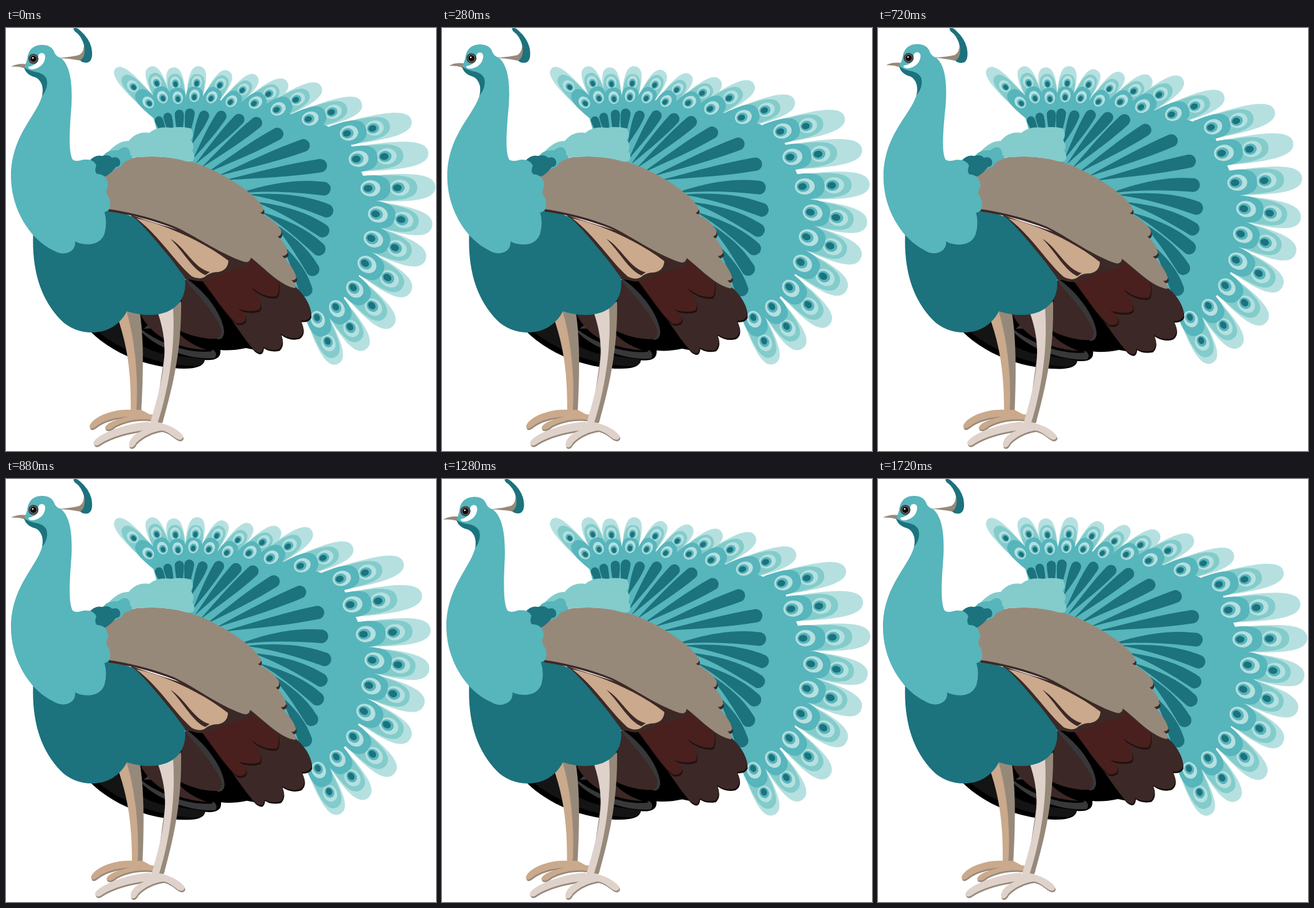
An HTML page that plays this animation: 690 px wide and 678 px high, repeating every 1760 ms.

```html
<!DOCTYPE html>
<html lang="en">
<head>
<meta charset="utf-8">
<title>Peacock</title>
<style>
  html, body { margin: 0; width: 100%; height: 100%; overflow: hidden; background: #fff; }
  svg { display: block; width: 100%; height: 100%; }
</style>
</head>
<body>
<svg id="stage" viewBox="0 0 690 678"></svg>
<script>
const LOOP = 1760, STEP = 40;
const TEAL = '#57b5bc', DEEP = '#1c727d', PALE = '#83cccb', ICE = '#b6e0e0',
      TAUPE = '#97897a', TAN = '#caa98c', BLUSH = '#dfd2cb',
      BROWN = '#3c2826', MAROON = '#49201d', GREY = '#38383a', SOOT = '#141414';

const stage = document.getElementById('stage');
const bent = [];     // paths whose points follow the tail sway
const placed = [];   // groups pinned to a pair of swaying points

function add(parent, tag, attrs = {}) {
  const el = document.createElementNS('http://www.w3.org/2000/svg', tag);
  for (const key in attrs) el.setAttribute(key, attrs[key]);
  return parent.appendChild(el);
}
const layer = () => add(stage, 'g');
const shape = (parent, fill, d, extra) => add(parent, 'path', { fill, d, ...extra });
const ellipse = (parent, fill, cx, cy, rx, ry = rx) => add(parent, 'ellipse', { fill, cx, cy, rx, ry });

function flex(fill, d, extra) {
  bent.push({ el: shape(stage, fill, d, extra), d });
}
function pin(parent, from, to) {
  const el = add(parent, 'g');
  placed.push({ el, from, to });
  return el;
}

// Sway of the tail and wing: a leaning rotation that fades out to the left.
function warp(x, y, sway) {
  const w = sway * Math.min(1, Math.max(0, (x - 280) / 190));
  const up = 415 - y;
  return [
    x - w * up * (up > 0 ? 0.052 : 0.03),
    y - w * (0.05 * (x - 490) + 0.028 * Math.max(0, up))
  ];
}

// Rounded petal along the x axis, already broad at its base.
function petal(x0, x1, w) {
  const k = x0 + 0.55 * (x1 - x0);
  return `M${x0},${-w * .9} C${k},${-w * 1.12} ${x1},${-w * 1.25} ${x1},0 ` +
         `C${x1},${w * 1.25} ${k},${w * 1.12} ${x0},${w * .9}Z`;
}
function eye(parent, x, w) {
  ellipse(parent, ICE, x + w * .18, 0, w * .76, w * .62);
  ellipse(parent, TEAL, x + w * .06, 0, w * .5, w * .42);
  ellipse(parent, DEEP, x, 0, w * .33, w * .26);
}

// Tail feathers: inner eye, outer eye, length of the tip.
const feathers = [
  [230,121, 205,95, 42], [252,113, 242,89, 29], [276,114, 272,90, 27],
  [302,111, 306,89, 28], [329,113, 343,92, 27], [360,119, 379,100, 33],
  [398,121, 421,106, 36], [434,131, 465,115, 46], [485,146, 522,135, 51],
  [547,169, 588,161, 64], [562,210, 607,206, 71], [581,257, 628,256, 61],
  [593,298, 634,307, 51], [586,337, 624,352, 53], [576,377, 612,400, 44],
  [557,416, 587,445, 47], [529,447, 552,479, 44], [499,464, 516,502, 40]
];
const tips = layer(), mids = layer();
const rim = feathers.map(([x, y]) => `${x},${y}`);
flex(TEAL, `M242,163 L${rim.join(' L')} L487,470 L440,430 L300,225Z`);
const roots = layer();

feathers.forEach(([x, y, ox, oy, tip], i) => {
  const len = Math.hypot(ox - x, oy - y);
  const w = Math.min(21, 13.5 + Math.max(0, i - 5) * 1.5, 21 - (i - 14));
  const group = parent => pin(parent, [x, y], [ox, oy]);
  shape(group(tips), ICE, petal(-.4 * len, len + tip, w));
  const mid = group(mids);
  shape(mid, PALE, petal(-.4 * len, len * 1.68, w * .92));
  eye(mid, len, w);
  const root = group(roots);
  shape(root, TEAL, petal(-.6 * len, len * .76, w * .95));
  eye(root, 0, w);
});

// Dark barbs: base, far end.
const barbs = [
  [255,172, 243,142], [266,172, 258,136], [279,172, 278,131], [291,172, 296,129],
  [299,185, 321,133], [302,207, 350,134], [306,216, 380,140], [316,222, 409,146],
  [326,230, 444,165], [343,236, 487,185], [356,243, 515,219], [378,264, 521,257],
  [392,267, 525,295], [402,279, 518,329], [412,296, 511,360], [428,312, 499,395],
  [442,346, 486,429]
];
const barbLayer = layer();
barbs.forEach(([x, y, ex, ey], i) => {
  const len = Math.hypot(ex - x, ey - y), r = Math.min(11, 6.5 + .42 * i), k = len - r;
  const base = i < 4 ? 4.5 : .5;
  const bow = i > 10 ? -.05 * len : 0;   // the lower barbs droop
  shape(pin(barbLayer, [x, y], [ex, ey]), DEEP,
    `M0,${-base} C${k * .35},${bow - Math.max(base, r * .5)} ${k * .68},${bow - r} ${k},${-r} ` +
    `A${r},${r} 0 0 1 ${k},${r} C${k * .68},${bow + r} ${k * .35},${bow + Math.max(base, r * .5)} 0,${base}Z`);
});

// Under-tail
flex('#000', 'M137,488 C170,520 225,545 285,546 Q317,546 319,532 Q346,534 344,516 Q362,518 385,513 L400,516 L310,395 L200,440Z');
flex(SOOT, 'M150,489 C190,520 245,540 300,542 Q317,542 319,531 L250,522 C215,512 190,495 178,468Z');
flex(GREY, 'M216,486 C245,516 300,533 335,529 Q340,522 333,516 C300,516 260,500 235,470Z');
flex('#000', 'M216,482 C250,509 300,523 331,518 L300,480Z');
flex(BROWN, 'M214,455 C228,487 262,513 322,516 C292,506 270,490 258,455Z');
flex(GREY, 'M287,400 C325,425 350,465 350,489 Q348,500 339,499 L300,440Z');
flex(BROWN, 'M277,484 C295,494 322,499 337,498 Q347,496 345,482 C332,452 308,428 285,402Z');

// Legs
const legs = layer();
function foot(fill, d) {
  shape(legs, TAUPE, d, { transform: 'translate(1 2.5)' });
  shape(legs, fill, d);
}
shape(legs, TAUPE, 'M192,450 L214,450 C222,500 220,560 217,615 L207,615Z');
shape(legs, TAN, 'M178,462 L193,452 C207,500 213,560 209,616 L200,616 C201,570 198,515 178,462Z');
foot(TAN, 'M200,612 C172,610 137,624 134,639 Q136,645 144,639 C156,629 175,624 196,623 C176,627 159,634 159,642 Q165,647 175,638 C195,628 215,625 240,629 L252,627 Q246,620 230,619 L217,612Z');
shape(legs, TAUPE, 'M266,448 L281,438 C282,520 266,580 251,633 L238,633Z');
shape(legs, BLUSH, 'M243,455 L268,446 C272,510 262,575 243,634 L231,634C255,555 263,510 243,455Z');
foot(BLUSH, 'M230,631 C198,632 145,650 140,665 Q143,673 152,666 C170,655 195,648 220,645 C205,650 195,662 198,671 Q204,675 209,665 C220,654 235,647 250,645 C265,648 272,661 280,660 Q287,657 282,651 C272,641 262,637 245,632 L230,634Z');

// Wing quills
const primaries = 'M318,402 C345,440 375,490 398,516 Q411,527 413,511 Q423,518 438,515 Q447,507 441,490 Q455,500 470,496 Q482,489 473,469 Q485,470 489,462 Q490,440 468,418 L400,370Z';
flex('#120c0b', primaries, { transform: 'translate(1 2.5)' });
flex(BROWN, primaries);
const coverts = 'M313,402 C335,430 352,458 370,473 Q384,475 385,465 Q385,457 372,450 Q395,457 407,451 Q414,440 394,416 Q415,433 434,430 Q440,423 437,403 L392,370 L358,375Z';
flex('#201110', coverts, { transform: 'translate(1 3)' });
flex(MAROON, coverts);

// Secondary feathers over the belly
flex(BROWN, 'M200,300 L320,340 L393,370 L390,382 L358,390 L318,406 L284,402Z');
shape(stage, DEEP, 'M44,320 C40,385 54,432 88,468 C113,494 170,500 194,454 C232,466 266,460 281,436 Q290,420 287,400 C265,370 240,335 207,304 L165,288Z');
flex(BROWN, 'M200,300 L335,342 L361,374 Q357,393 340,396 Q327,394 321,402 Q310,409 298,403 C265,377 243,338 206,304Z');
flex(TAN, 'M209,305 C242,311 310,337 357,373 Q356,388 341,391 Q327,391 319,399 Q310,404 298,398 C268,372 248,335 209,305Z');
flex(BROWN, 'M264,338 C287,351 302,386 327,391 L320,396 C300,388 286,360 264,338Z');

const wing = 'M158,237 Q180,212 210,207 C260,203 300,211 340,232 C375,250 406,273 413,289 Q414,295 408,296 Q432,309 441,323 Q444,332 436,334 Q450,346 452,360 Q449,366 443,365 Q462,384 466,400 Q464,405 458,404 Q468,413 464,417 C440,413 415,385 393,368 Q391,378 380,374 C340,360 302,332 270,318 C240,306 200,295 163,290Z';
flex(BROWN, wing, { transform: 'translate(1.5 4)' });
flex(TAUPE, wing);

// Shoulder
shape(stage, PALE, 'M158,206 Q178,180 197,181 Q210,165 230,168 Q243,157 265,160 Q280,157 297,161 Q303,174 296,179 Q304,188 299,197 Q305,206 300,213 Q294,216 283,212 C255,205 225,205 203,208 Q180,216 158,235Z');
shape(stage, TEAL, 'M155,207 Q160,195 180,196 Q190,188 196,193 Q200,198 199,203 Q206,207 199,211 Q188,213 185,222 Q172,226 160,236Z');
shape(stage, DEEP, 'M132,215 Q142,202 154,205 Q165,202 170,208 Q180,205 183,213 Q185,222 176,223 Q168,234 159,238 L140,240Z');

// Head, neck and breast
const head = layer();
shape(head, TAUPE, 'M8,62 Q18,56 34,58 L32,65 Q20,61 8,62Z');
shape(head, TAUPE, 'M84,48 Q108,46 118,43 Q126,38 125,24 L131,42 Q128,53 118,52 Q103,49 84,48Z');
shape(head, DEEP, 'M108,1 Q113,-2 119,4 Q133,16 137,31 Q141,51 132,55 Q124,57 119,52 Q128,47 126,30 Q122,13 110,5Z');
shape(head, TEAL, 'M34,50 Q36,28 57,27 Q74,27 78,40 Q81,46 88,48 C103,60 107,88 105,125 C101,175 101,200 107,211 Q112,215 124,211 Q140,209 145,220 Q141,230 146,234 Q162,234 164,252 Q160,262 161,265 Q170,276 166,290 Q163,294 158,295 Q163,312 158,330 Q150,350 123,346 Q116,345 111,342 Q112,357 96,361 Q86,363 75,356 C38,338 8,290 8,238 C8,170 53,138 59,104 Q61,88 45,76 Q32,70 30,62Z');
shape(head, DEEP, 'M29,63 Q32,75 47,79 Q62,85 58,109 Q69,95 65,81 Q60,72 46,70 Q36,68 29,63Z');
shape(head, '#fff', 'M36,62 Q35,67 45,66 Q61,62 63,47 Q63,40 57,40 Q50,41 52,50 Q49,60 36,62Z');
ellipse(head, GREY, 44, 49.5, 8);
ellipse(head, '#77716d', 44, 49.5, 6.2);
ellipse(head, '#100c0c', 44, 49.5, 5);
ellipse(head, '#fff', 43, 48, 1.3);

const ease = u => (1 - Math.cos(Math.PI * u)) / 2;
// Eased value through [time, value] stops.
function follow(stops, t) {
  const i = stops.findIndex(([time]) => time > t);
  const [t0, a] = stops[i - 1], [t1, b] = stops[i];
  return a + (b - a) * ease((t - t0) / (t1 - t0));
}
const nodStops = [[0, 0], [LOOP / 3, 1], [LOOP * 2 / 3, -1], [LOOP, 0]];
const swayStops = [[0, 0], [725, 1], [1510, 0], [LOOP, 0]];

function render(t) {
  const sway = follow(swayStops, t);
  for (const { el, d } of bent) {
    el.setAttribute('d', d.replace(/(-?[\d.]+),(-?[\d.]+)/g, (_, x, y) =>
      warp(+x, +y, sway).map(v => v.toFixed(2)).join()));
  }
  for (const { el, from, to } of placed) {
    const [x, y] = warp(...from, sway), [tx, ty] = warp(...to, sway);
    const angle = Math.atan2(ty - y, tx - x) * 180 / Math.PI;
    el.setAttribute('transform', `translate(${x} ${y}) rotate(${angle})`);
  }
  const lean = 0.0135 * sway;
  legs.setAttribute('transform', `matrix(1 0 ${lean} 1 ${-450 * lean} 0)`);
  head.setAttribute('transform', `rotate(${1.8 * follow(nodStops, t)} 110 270)`);
}

const start = performance.now();
function tick() {
  const t = (performance.now() - start) % LOOP;
  render(Math.floor(t / STEP) * STEP);
  requestAnimationFrame(tick);
}
tick();
</script>
</body>
</html>
```
